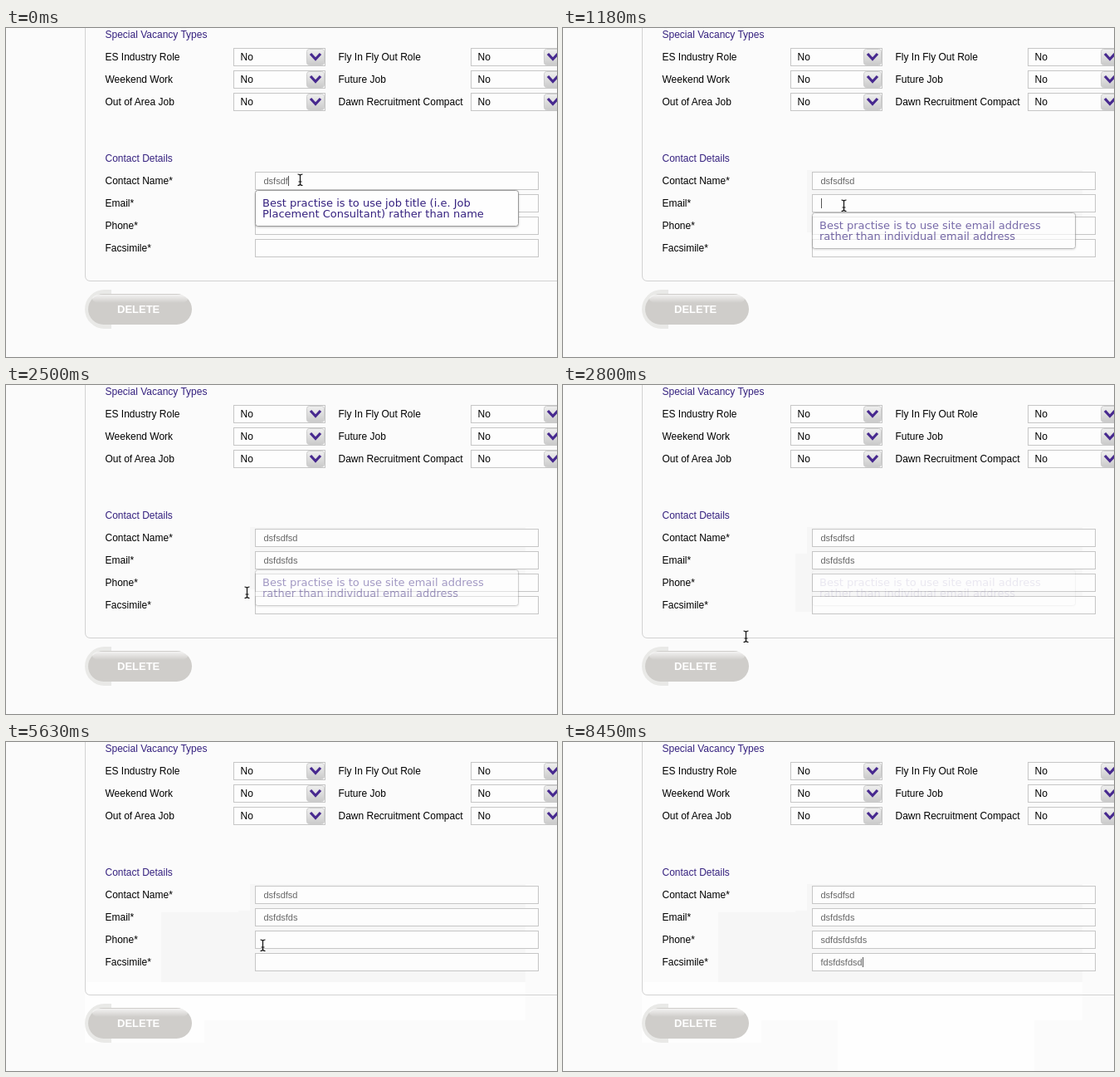
Write an HTML page that moves like this. It is 664 px wide and 396 px high and loops after 8940 ms.

```html
<!DOCTYPE html>
<html lang="en">
<head>
<meta charset="utf-8">
<title>Vacancy form</title>
<style>
  html, body { margin: 0; width: 100%; height: 100%; overflow: hidden; background: #fbfbfb; }
  svg { display: block; width: 664px; height: 396px; }
  text { font: 12px "Liberation Sans", Arial, sans-serif; fill: #000; white-space: pre; }
  .title { fill: #35217f; }
  .typed { font-size: 11px; fill: #666; }
  .box { fill: #fdfdfd; stroke: #c6c6c6; }
  .tip rect { fill: #fefefe; stroke: #999; filter: drop-shadow(0 1px 1px #0003); }
  .tip text { font: 13px "DejaVu Sans", Verdana, sans-serif; fill: #35217f; }
  .delete { font-weight: bold; font-size: 13px; fill: #fff; }
  .knob { fill: url(#knob); stroke: #cdcdcd; }
  .chevron { fill: none; stroke: #47298f; stroke-width: 3.2; }
  .dark { fill: #f6f6f6; }
  .light { fill: #fefefe; }
  #beam { fill: none; stroke: #111; stroke-width: 1.2; }
  #hand { stroke: #111; stroke-width: 1.1; }
</style>
</head>
<body>
<svg viewBox="0 0 664 396">
  <defs>
    <linearGradient id="knob" x2="0" y2="1">
      <stop stop-color="#f0f0f0"/><stop offset="1" stop-color="#cacaca"/>
    </linearGradient>
    <linearGradient id="gloss" x2="0" y2="1">
      <stop stop-color="#fff" stop-opacity=".75"/><stop offset="1" stop-color="#fff" stop-opacity="0"/>
    </linearGradient>
    <clipPath id="left"><path d="M90 310h37v56h-37z"/></clipPath>
  </defs>
  <g id="patches"></g>
  <path d="M95.5-5V298q0 6.500 6.500 6.500H670" fill="none" stroke="#d2d2d2"/>
  <text class="title" x="119.500" y="12">Special Vacancy Types</text>
  <text class="title" x="119.500" y="161">Contact Details</text>
  <g id="form"></g>
  <rect id="ring" x="95" y="315" width="134" height="47" rx="23.500" clip-path="url(#left)"/>
  <rect id="pill" x="99" y="320" width="125" height="37" rx="18.500"/>
  <rect x="104" y="321" width="115" height="10" rx="9" fill="url(#gloss)"/>
  <text class="delete" x="134" y="343">DELETE</text>
  <rect id="caret" width="1" height="12" fill="#555"/>
  <g id="tips"></g>
  <path id="beam" d="M-3-6.500Q0-6.500 0-4.500V5Q0 7-3 7M3-6.500Q0-6.500 0-4.500M0 5Q0 7 3 7M-2 2.500H2"/>
  <g id="hand">
    <path d="M0 1.500C0-.5 3-.5 3 1.500V6.500C3 5 6 5 6 6.500 6 5.500 8.500 5.500 8.500 7 9 6 11.500 6.500 11.500 8.500V12C11.500 14 10.500 15 10.500 17H3.500C3.500 15-3 11.500-3 9-3 7.500-1 7.500 0 9.500Z" fill="#fff"/>
    <path d="M3 6v3M6 6.500V9M8.500 7v2M4 11.500v3M6.200 11.500v3M8.400 11.500v3" fill="none" stroke-width=".9"/>
  </g>
</svg>
<script>
const LOOP = 8940, TICK = 148.2, LEAD = 12;
const $ = id => document.getElementById(id);
const clamp = (v, lo, hi) => Math.min(hi, Math.max(lo, v));
const rowY = i => 184 + 27 * i;

const types = [
  ['ES Industry Role', 'Fly In Fly Out Role'],
  ['Weekend Work', 'Future Job'],
  ['Out of Area Job', 'Dawn Recruitment Compact']
];

// from, rate: typing start and letters per tick; focus: ticks with the caret;
// blink: a tick where the caret lights up; home: tick it jumps to the text start
const fields = [
  { name: 'Contact Name*', text: 'dsfsdfsd', from: -6, rate: 1, focus: [0, 4], blink: 0 },
  { name: 'Email*', text: 'dsfdsfds', from: 8, rate: 2, focus: [8, 37], blink: 12, home: 17 },
  { name: 'Phone*', text: 'sdfdsfdsfds', from: 45, rate: 4, focus: [45, 49], blink: 45 },
  { name: 'Facsimile*', text: 'fdsfdsfdsd', from: 49, rate: 4, focus: [49, 61], blink: 50 }
];

const tips = [
  { y: 195, from: -9, to: 0, lines: ['Best practise is to use job title (i.e. Job', 'Placement Consultant) rather than name'] },
  { y: 222, from: 6, to: 15, lines: ['Best practise is to use site email address', 'rather than individual email address'] }
];

// Pointer glides, each easing out: from, to, x, y
const home = [354, 182];
const glides = [
  [0, 4, 344, 217], [7, 8, 338, 213],
  [15, 21, 180, 331],
  [33, 38, 309, 244],
  [39, 41, 331, 217], [41, 43, 337, 254],
  [50, 54, 590, 430]
];

// Faint background patches left behind by the pointer and tips
const patches = [
  [4, 'dark', 'M294 171H626V246H294z'],
  [17, 'dark', 'M280 203H626V273H280z'],
  [19, 'dark', 'M187 205H626V289H187z'],
  [19, 'light', 'M187 289H626V335H187z'],
  [34, 'light', 'M95 289H239V362H95z'],
  [52, 'light', 'M331 335H568V396H331z']
];

const label = (x, y, s) => `<text x="${x}" y="${y + 4}">${s}</text>`;
const select = (x, y) => `<rect class="box" x="${x + .5}" y="${y - 10.5}" width="110" height="21"/>
  ${label(x + 8.5, y, 'No')}
  <rect class="knob" x="${x + 88.5}" y="${y - 9.5}" width="21" height="19" rx="3"/>
  <path class="chevron" d="M${x + 93} ${y - 4}l6 6.500 6-6.500"/>`;
const input = (f, i) => `${label(119.5, rowY(i), f.name)}
  <rect class="box" x="300.500" y="${rowY(i) - 10.5}" width="341" height="21"/>
  <text class="typed" x="310.500" y="${rowY(i) + 4}"></text>`;

$('form').innerHTML = types.map(([a, b], i) => {
  const y = 35 + 27 * i;
  return label(119.5, y, a) + select(274, y) + label(400.5, y, b) + select(560, y);
}).join('') + fields.map(input).join('');

$('tips').innerHTML = tips.map(({ y, lines }) => `<g class="tip">
  <rect x="300.500" y="${y + .5}" width="317" height="43" rx="3"/>
  ${lines.map((s, i) => `<text x="309" y="${y + 20 + 13 * i}">${s}</text>`).join('')}</g>`).join('');

$('patches').innerHTML = patches.map(([, c, d]) => `<path class="${c}" d="${d}"/>`).join('');

const inputs = [...document.querySelectorAll('.typed')];
const tipEls = [...$('tips').children];
const shades = [...$('patches').children];
const show = (el, on) => { el.style.display = on ? '' : 'none'; };

function pointerAt(n) {
  let [x, y] = home;
  for (const [a, b, tx, ty] of glides) {
    const u = clamp((n - a) / (b - a), 0, 1);
    const e = 1 - (1 - u) ** 2;
    x += (tx - x) * e;
    y += (ty - y) * e;
  }
  return [Math.round(x), Math.round(y)];
}

function drawCaret(n) {
  const i = fields.findIndex(({ focus: [a, b] }) => n >= a && n < b);
  const f = fields[i];
  const typing = f && inputs[i].textContent.length < f.text.length;
  const on = f && (typing || (n - f.blink + 7) % 7 < 4);
  show($('caret'), on);
  if (!on) return;
  const w = n >= f.home ? 0 : inputs[i].getComputedTextLength();
  $('caret').setAttribute('x', Math.round(311 + w));
  $('caret').setAttribute('y', rowY(i) - 6);
}

function draw(t) {
  const n = Math.floor((t + LEAD) / TICK);
  shades.forEach((el, i) => show(el, n >= patches[i][0]));
  fields.forEach((f, i) => {
    inputs[i].textContent = f.text.slice(0, Math.max(0, (n - f.from) * f.rate));
  });
  tips.forEach((tip, i) => {
    const rise = clamp((n - tip.from) / 3, 0, 1);
    tipEls[i].style.opacity = rise * .45 ** Math.max(0, n - tip.to);
  });
  drawCaret(n);

  const [x, y] = pointerAt(n);
  const hand = x < 225 && y > 305;
  const hot = hand && x < 190;
  $('pill').setAttribute('fill', hot ? '#df231d' : '#cfcdca');
  $('ring').setAttribute('fill', hot ? '#c6c6c6' : '#e9e9e7');
  show($('hand'), hand);
  show($('beam'), !hand);
  $(hand ? 'hand' : 'beam').setAttribute('transform', `translate(${x + .5} ${y + .5})`);
}

const begin = performance.now();
function run() {
  draw((performance.now() - begin) % LOOP);
  requestAnimationFrame(run);
}
run();
</script>
</body>
</html>
```
